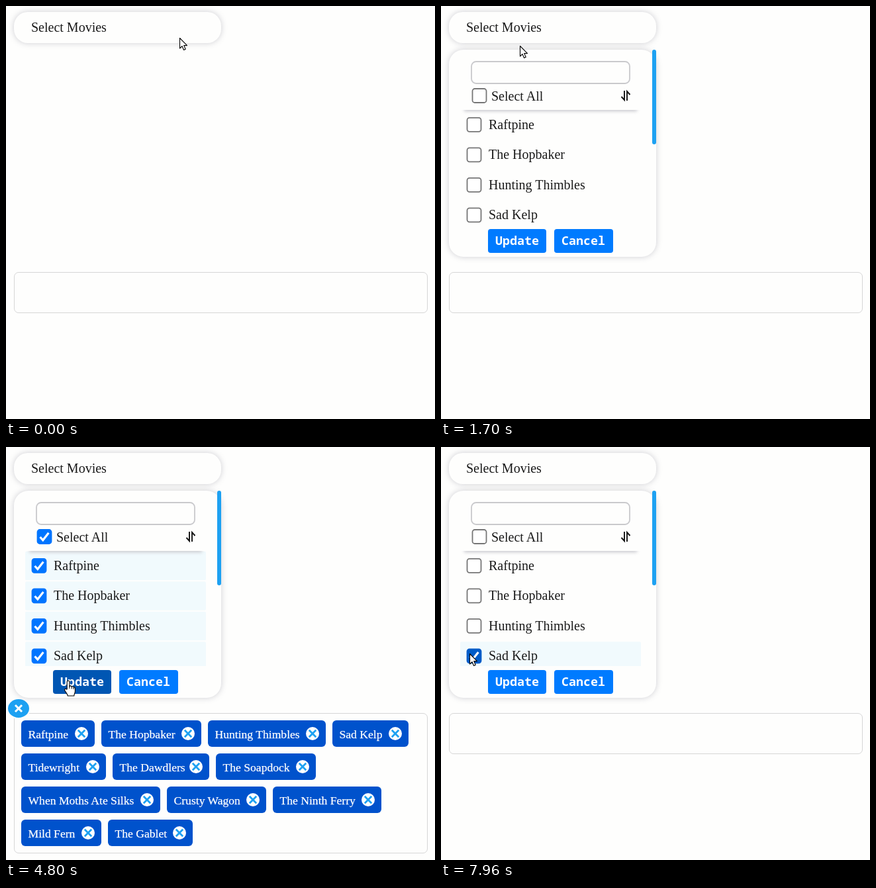
Animation, 648 px wide and 624 px high, one loop 8 s. Source, as an HTML page:

```html
<!DOCTYPE html>
<html lang="en">
<head>
<meta charset="utf-8">
<title>Multi-select dropdown</title>
<style>
html, body { margin: 0; width: 100%; height: 100%; overflow: hidden; background: #fefefd; }
svg { display: block; }
text { font: 20px "Liberation Serif", "Times New Roman", serif; fill: #1a1a1a; }
.card { fill: #fefefd; filter: drop-shadow(0 0 5px rgba(50, 50, 75, .24)); }
.button { font: 600 18.33px "Noto Sans Mono", monospace; fill: #fff; }
.chip { font-size: 17.6px; fill: #fff; stroke: #fff; stroke-width: .25; }
</style>
</head>
<body>
<script>
const LOOP = 8000;
const OPEN = [850, 1200], CHECK_ALL = 2700, UPDATE = 4800, CLEAR = 6700, CHECK_LAST = 7900;
const SKY = '#1da1f2';

// Title and chip width, by row
const CHIPS = [
  [['Raftpine', 111], ['The Hopbaker', 151], ['Hunting Thimbles', 178], ['Sad Kelp', 115]],
  [['Tidewright', 128], ['The Dawdlers', 146], ['The Soapdock', 151]],
  [['When Moths Ate Silks', 210], ['Crusty Wagon', 150], ['The Ninth Ferry', 164]],
  [['Mild Fern', 121], ['The Gablet', 128]]
];

// Pointer path: time, x, y
const PATH = [
  [0, 262, 48], [30, 262, 48], [430, 142, 42], [830, 219, 39], [1430, 219, 39],
  [1700, 119, 60], [2200, 68, 140], [2260, 68, 140], [2460, 61, 140], [3260, 61, 140],
  [3600, 88, 225], [3960, 73, 321], [4100, 73, 322], [4400, 94, 353], [5000, 94, 353],
  [5380, 90, 318], [5460, 90, 321], [5600, 90, 321], [5850, 76, 345], [6400, 12, 400],
  [7100, 12, 400], [7260, 34, 327], [7400, 34, 327], [7560, 41, 322], [7760, 41, 322],
  [7960, 43, 312]
];
const UPDATE_HOVER = [[4180, 0], [4380, 1], [5120, 1], [5380, 0], [5760, 0], [5860, .7], [5920, .7], [6080, 0]];
const CLEAR_HOVER = [[6320, 0], [6500, 1]];

function el(parent, tag, attrs = {}, text) {
  const node = document.createElementNS('http://www.w3.org/2000/svg', tag);
  for (const key in attrs) node.setAttribute(key, attrs[key]);
  if (text) node.textContent = text;
  parent.append(node);
  return node;
}

const rect = (parent, x, y, width, height, rx, attrs) =>
  el(parent, 'rect', { x, y, width, height, rx, ...attrs });
const label = (parent, x, y, text, cls = '') => el(parent, 'text', { x, y, class: cls }, text);
const group = (parent, attrs) => el(parent, 'g', attrs);
const show = (node, on) => node.setAttribute('visibility', on ? 'inherit' : 'hidden');
const inside = ([px, py], x, y, w, h) => px >= x && px <= x + w && py >= y && py <= y + h;
const clamp = v => Math.min(1, Math.max(0, v));

// Linear interpolation over [time, ...values] keys
function sample(keys, t) {
  if (t <= keys[0][0]) return keys[0].slice(1);
  const i = keys.findIndex(k => k[0] > t);
  if (i < 0) return keys[keys.length - 1].slice(1);
  const a = keys[i - 1], b = keys[i], p = (t - a[0]) / (b[0] - a[0]);
  return a.slice(1).map((v, j) => v + (b[j + 1] - v) * p);
}

const mix = (a, b, p) => `rgb(${a.map((v, i) => Math.round(v + (b[i] - v) * p))})`;

function cross(parent, x, y, r, color, width) {
  el(parent, 'path', {
    d: `M${x - r} ${y - r}l${2 * r} ${2 * r}m0 ${-2 * r}l${-2 * r} ${2 * r}`,
    stroke: color, 'stroke-width': width
  });
}

function checkbox(parent, x, y) {
  const box = rect(parent, x - 10.5, y - 10.5, 21, 21, 3.5, { 'stroke-width': 1.8 });
  const tick = el(parent, 'path', {
    d: `M${x - 6.5} ${y + .5}l4.3 4.8l8.6 -11`, fill: 'none', stroke: '#fff', 'stroke-width': 3.2
  });
  return (on, pointer) => {
    const hover = inside(pointer, x - 11.5, y - 11.5, 23, 23);
    const blue = hover ? '#005cc8' : '#0075ff';
    box.setAttribute('fill', on ? blue : '#fff');
    box.setAttribute('stroke', on ? blue : hover ? '#4f4f4f' : '#767676');
    show(tick, on);
  };
}

function button(parent, x, w, text) {
  const face = rect(parent, x, 337, w, 36, 4, { fill: '#007bff' });
  label(parent, x + 11, 361, text, 'button');
  return face;
}

const svg = el(document.body, 'svg', { width: 648, height: 624, viewBox: '0 0 648 624' });
const defs = el(svg, 'defs');
rect(el(defs, 'clipPath', { id: 'list' }), 29, 157, 273, 174);
rect(el(defs, 'clipPath', { id: 'below' }), 20, 157, 290, 14);

// Selection box and chips
const tray = rect(svg, 12.5, 402.5, 624, 61, 6.5, { fill: 'none', stroke: '#d6d6d6' });
const chips = group(svg);
CHIPS.forEach((row, r) => {
  let x = 23;
  const y = 413 + 50 * r;
  for (const [title, w] of row) {
    rect(chips, x, y, w, 40, 6, { fill: '#0052cc' });
    label(chips, x + 10.5, y + 27, title, 'chip');
    el(chips, 'circle', { cx: x + w - 20, cy: y + 20, r: 10, fill: '#fff' });
    cross(chips, x + w - 20, y + 20, 5.2, SKY, 2.8);
    x += w + 10;
  }
});
const clear = el(chips, 'ellipse', {
  cx: 19, cy: 395, rx: 17, ry: 15, stroke: '#fefefd', 'stroke-width': 2
});
cross(chips, 19, 395, 5, '#fff', 3);

// Closed select
rect(svg, 12, 9, 313, 47, 21, { class: 'card' });
const heading = label(svg, 38, 39, 'Select Movies');

// Dropdown panel
const panel = group(svg);
rect(panel, 12, 66, 313, 313, 22, { class: 'card' });
rect(panel, 319, 66, 6, 143, 3, { fill: SKY });
rect(panel, 46, 84, 239, 33, 7, { fill: '#fefefd', stroke: '#c9c9cc', 'stroke-width': 1.8 });
const checkAll = checkbox(panel, 58, 135.5);
label(panel, 76, 143, 'Select All');
el(panel, 'path', {
  d: 'M277 128v14l-4.5 -5M281 143v-14l4.5 5', fill: 'none', stroke: '#111', 'stroke-width': 1.9
});

const list = group(panel, { 'clip-path': 'url(#list)' });
const items = CHIPS[0].map(([title], i) => {
  const y = 179.3 + 45.5 * i;
  const back = rect(list, 29, y - 21.5, 273, 43.5, 2, { fill: '#f1fafd' });
  const set = checkbox(list, 50, y);
  label(list, 72, Math.round(y + 6.6), title);
  return (on, pointer) => { show(back, on); set(on, pointer); };
});
rect(group(panel, { 'clip-path': 'url(#below)' }), 35, 140, 261, 19, 0,
  { fill: '#c8c8ce', style: 'filter: blur(2.5px)' });

const update = button(panel, 71, 88, 'Update');
button(panel, 171, 89, 'Cancel');

// Pointers
const ink = { fill: '#fff', stroke: '#000', 'stroke-width': 1.1, 'stroke-linejoin': 'round' };
const cursor = group(svg);
const arrow = el(cursor, 'path', {
  d: 'M.5 .5V16L4 12.7L6.6 18.4L9.2 17.2L6.7 11.6H11.5Z', ...ink
});
const hand = group(cursor);
el(hand, 'path', {
  d: 'M-1.8 13V1.8a1.8 1.8 0 0 1 3.6 0V8.5c1-1 3.2-.6 3.4 .6c1-.7 2.8-.3 3 .9' +
     'c1.2-.5 2.2 .2 2.2 1.5V16c0 3-1.6 4-1.6 7H-.8c-.2-3-3-5-4.6-8.4c-.9-1.8 1.2-2.9 2.2-1.6z', ...ink
});
el(hand, 'path', { d: 'M1.8 8v4M5.2 9v3.5M8.2 10v3', stroke: '#000', 'stroke-width': 1 });

function render(t) {
  const pointer = sample(PATH, t);
  const onHeading = t >= 30 && inside(pointer, 12, 9, 313, 47);
  const onButton = inside(pointer, 71, 337, 88, 36) || inside(pointer, 3, 381, 32, 28);

  const p = clamp((t - OPEN[0]) / (OPEN[1] - OPEN[0]));
  panel.setAttribute('opacity', p);
  panel.setAttribute('transform', `translate(0 ${-62 * (1 - p)})`);

  const all = t >= CHECK_ALL && t < CLEAR;
  checkAll(all, pointer);
  items.forEach((set, i) => set(all || (i === 3 && t >= CHECK_LAST), pointer));

  const filled = t >= UPDATE && t < CLEAR;
  show(chips, filled);
  tray.setAttribute('height', filled ? 211 : 61);
  update.setAttribute('fill', mix([0, 123, 255], [0, 86, 179], sample(UPDATE_HOVER, t)[0]));
  clear.setAttribute('fill', mix([29, 161, 242], [10, 115, 200], sample(CLEAR_HOVER, t)[0]));

  heading.style.fill = onHeading ? '#000' : '#1a1a1a';
  cursor.setAttribute('transform', `translate(${pointer.map(Math.round).join(' ')})`);
  show(hand, onHeading || onButton);
  show(arrow, !onHeading && !onButton);
}

const start = performance.now();
function tick() {
  render((performance.now() - start) % LOOP);
  requestAnimationFrame(tick);
}
tick();
</script>
</body>
</html>
```
